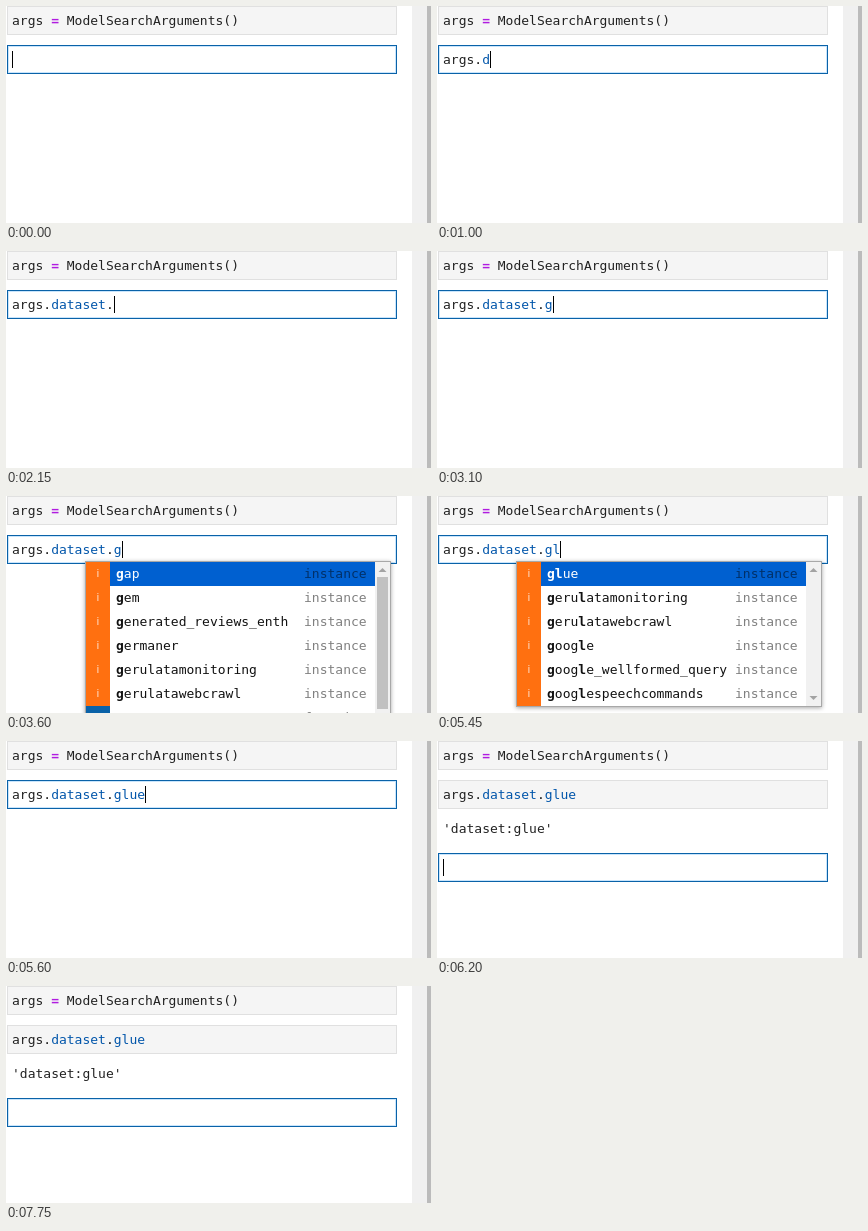
Animation of 425 by 217 pixels, one loop 7800 ms. Source, as an HTML page:

```html
<!DOCTYPE html>
<html lang="en">
<head>
<meta charset="utf-8">
<title>Notebook completion</title>
<style>
  html, body { margin: 0; width: 100%; height: 100%; overflow: hidden; background: #fff; }
  svg { display: block; width: 425px; height: 217px; }
  text { font: 13px "DejaVu Sans Mono", monospace; fill: #212121; white-space: pre; }
  .prop { fill: #0055aa; }
  .op { fill: #b01be0; font-weight: bold; }
  .hit { font-weight: bold; }
  .row text { fill: #111; }
  .row .kind { fill: #000; fill-opacity: .5; }
  .row.on .name { fill: #fff; }
  .row .icon { font: 11px "Open Sans", sans-serif; fill: #fff; fill-opacity: .85; text-anchor: middle; }
  .panel { filter: drop-shadow(0 1px 2px rgba(0, 0, 0, .35)); }
</style>
</head>
<body>
<svg id="stage" viewBox="0 0 425 217"></svg>
<script>
const LOOP = 7800;
const CHAR = 13 * 0.60205;
const LEFT = 6;
const ORANGE = '#ff7010', BLUE = '#0060d0', TEAL = '#0a62a8';

// [time, typed text]
const typing = [
  [0, ''], [300, 'a'], [450, 'ar'], [600, 'arg'], [650, 'args'], [850, 'args.'],
  [1000, 'args.d'], [1300, 'args.dataset'], [2150, 'args.dataset.'],
  [3100, 'args.dataset.g'], [4400, 'args.dataset.gl'], [5600, 'args.dataset.glue']
];
// times at which the caret is hidden and shown again
const blinks = [
  [1800, 2150], [2700, 3100], [3650, 4150], [4900, 5450],
  [6150, 6200], [6700, 7200], [7750, 7800]
];
const RUN = 6200;

const stage = document.getElementById('stage');

function el(parent, tag, attrs = {}, text) {
  const node = document.createElementNS('http://www.w3.org/2000/svg', tag);
  for (const key in attrs) node.setAttribute(key, attrs[key]);
  if (text !== undefined) node.textContent = text;
  parent.appendChild(node);
  return node;
}

const rect = (parent, x, y, width, height, fill, more) =>
  el(parent, 'rect', { x, y, width, height, fill, ...more });

const show = (node, on) => node.setAttribute('visibility', on ? 'visible' : 'hidden');

function cell(y, active) {
  const g = el(stage, 'g');
  rect(g, 1.5, y + .5, 389, 28, active ? '#fff' : '#f5f5f5',
    { stroke: active ? TEAL : '#e0e0e0' });
  if (active) rect(g, 2.5, y + 1.5, 387, 26, 'none', { stroke: '#64b5f6', 'stroke-opacity': .35 });
  return g;
}

// Splits a word into plain and bold parts by the letters of the query, in order
function addMatched(parent, word, query) {
  let next = 0;
  for (const ch of word) {
    const hit = ch === query[next];
    if (hit) next++;
    el(parent, 'tspan', hit ? { class: 'hit' } : {}, ch);
  }
}

function addRow(g, i, word, query, kind) {
  const y = 66 + 24 * i, on = i === 0, isFunc = kind === 'function';
  const row = el(g, 'g', { class: on ? 'row on' : 'row' });
  if (on) rect(row, 104, y, 265, 24, BLUE);
  rect(row, 80, y, 24, 24, isFunc ? TEAL : ORANGE);
  el(row, 'text', { class: 'icon', x: 92, y: y + 15 }, kind[0]);
  addMatched(el(row, 'text', { class: 'name', x: 110, y: y + 16 }), word, query);
  el(row, 'text', { class: 'kind', x: 298, y: y + 16 }, kind);
}

function popup(words, query, height) {
  const g = el(stage, 'g');
  rect(g, 79.5, 65.5, 305, height + 1, '#fff', { stroke: '#a8a8a8', class: 'panel' });
  words.forEach((word, i) => addRow(g, i, word, query, word === 'get' ? 'function' : 'instance'));
  rect(g, 369, 66, 15, height, '#f1f1f1');
  el(g, 'path', { d: 'M372.5 76l4-4 4 4z', fill: '#a3a3a3' });
  return g;
}

// Page
rect(stage, 406, 0, 15, 217, '#f0f0f0');
rect(stage, 421, 0, 4, 217, '#bbbbbb');
cell(0, false);
const header = el(stage, 'text', { x: LEFT, y: 19 });
el(header, 'tspan', {}, 'args ');
el(header, 'tspan', { class: 'op' }, '=');
el(header, 'tspan', {}, ' ModelSearchArguments()');

const editing = cell(39, true);
const done = cell(39, false);
el(done, 'text', { x: LEFT, y: 92 }, "'dataset:glue'");
const fresh = cell(112, true);
const line = el(stage, 'text', { x: LEFT, y: 58 });
const caret = rect(stage, LEFT, 45, 1, 17, '#000');

const wide = popup(['gap', 'gem', 'generated_reviews_enth', 'germaner',
  'gerulatamonitoring', 'gerulatawebcrawl', 'get'], 'g', 240);
rect(wide, 371, 81, 11, 132, '#c1c1c1');
const narrow = popup(['glue', 'gerulatamonitoring', 'gerulatawebcrawl', 'google',
  'google_wellformed_query', 'googlespeechcommands'], 'gl', 144);
el(narrow, 'path', { d: 'M372.5 200l4 4 4-4z', fill: '#a3a3a3' });

let shown = '';
function setLine(text) {
  if (text === shown) return;
  shown = text;
  line.textContent = '';
  for (const part of text.split(/(\.)/)) {
    const plain = part === '.' || text.startsWith(part) && !line.childNodes.length;
    el(line, 'tspan', plain ? {} : { class: 'prop' }, part);
  }
}

function draw(t) {
  const ran = t >= RUN;
  const text = typing.filter(step => step[0] <= t).pop()[1];
  setLine(text);
  show(editing, !ran);
  show(done, ran);
  show(fresh, ran);
  show(wide, t >= 3600 && t < 4400);
  show(narrow, t >= 4400 && t < 5600);
  show(caret, !blinks.some(([off, on]) => t >= off && t < on));
  caret.setAttribute('x', ran ? LEFT : Math.round(LEFT + text.length * CHAR));
  caret.setAttribute('y', ran ? 118 : 45);
}

const start = performance.now();
function tick() {
  draw((performance.now() - start) % LOOP);
  requestAnimationFrame(tick);
}
draw(0);
requestAnimationFrame(tick);
</script>
</body>
</html>
```
